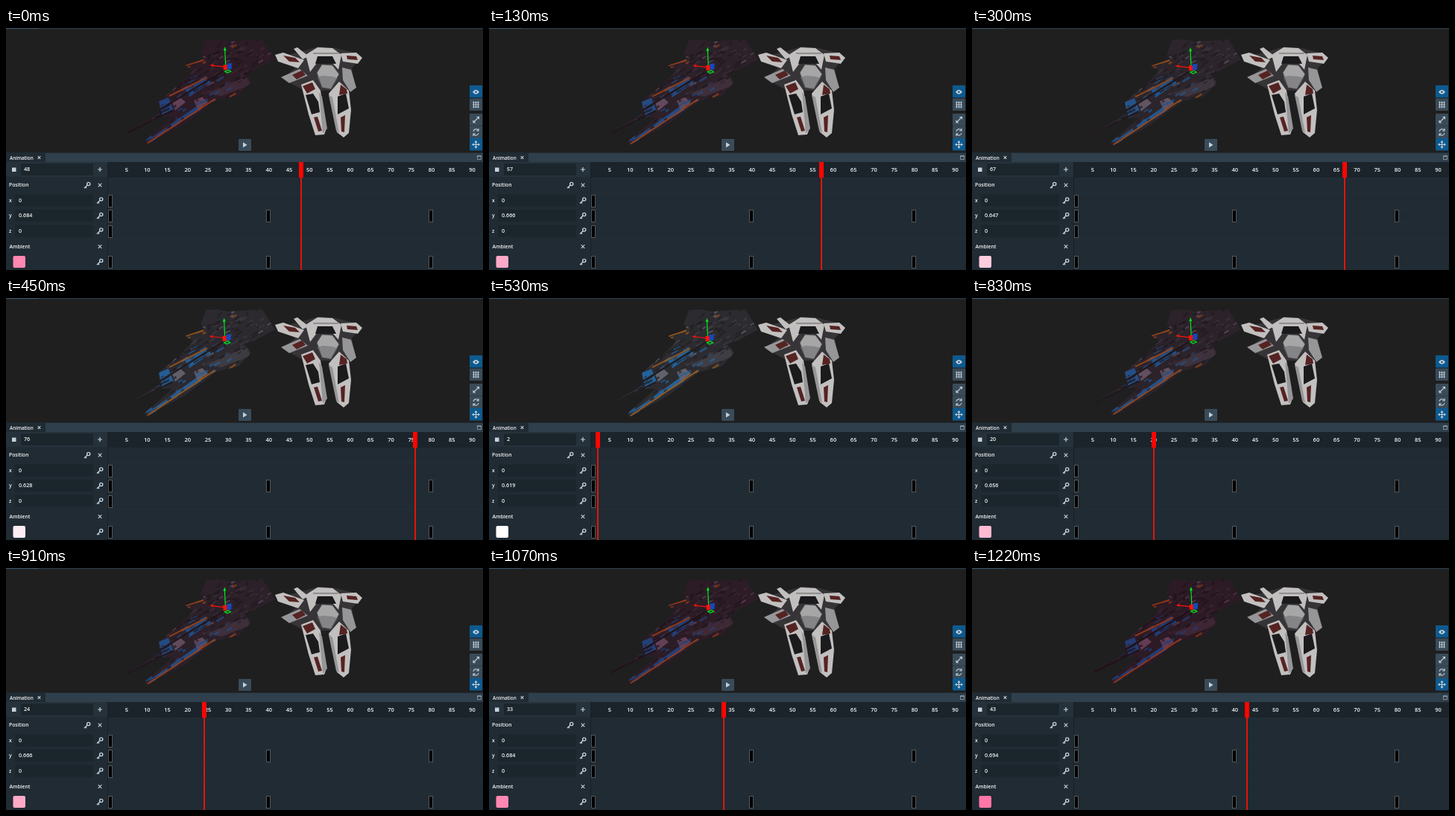
An HTML page with a canvas for the animation above (1300 ms loop, 640x325 px).

```html
<!DOCTYPE html>
<html lang="en">
<head>
<meta charset="utf-8">
<title>Animation timeline</title>
<style>
html, body { margin: 0; width: 100%; height: 100%; overflow: hidden; background: #202b33; }
canvas { display: block; }
</style>
</head>
<body>
<canvas id="stage" width="640" height="325"></canvas>
<script>
const g = document.getElementById('stage').getContext('2d');
const LOOP = 1300, STEPS = 17, RESTART = 7;
const ICON = '#c6d0d8';
const frameX = n => 134.7 + 5.453 * n;
const rowY = r => 211 + 20.5 * r;

function box(x, y, w, h, color, r = 0) {
  g.fillStyle = color;
  g.beginPath();
  g.roundRect(x, y, w, h, r);
  g.fill();
}
function shape(color, d) {
  g.fillStyle = color;
  g.fill(new Path2D(d));
}
function stroke(color, d, width = 1) {
  g.strokeStyle = color;
  g.lineWidth = width;
  g.stroke(new Path2D(d));
}
function text(s, x, y, size = 6.8, align = 'left') {
  g.font = `600 ${size}px "Open Sans", "Noto Sans", sans-serif`;
  g.textAlign = align;
  g.fillStyle = '#f4f7f9';
  g.fillText(s, x, y);
}
function random(seed) {
  return () => (seed = (seed * 16807) % 2147483647) / 2147483647;
}

// Blue ship: a hull outline filled with seeded plating along its long axis
const hull = new Path2D('M162 139L206 114 205 98 236 72 251 57 240 50 266 41 261 35 268 16 282 15 300 18 344 15 361 42 322 62 329 72 312 90 282 97 240 128 188 156 186 151 223 119 207 119 165 141Z');
const DARK = [31, 30, 34], GREY = [62, 62, 68], STEEL = [98, 98, 108], BLUE = [36, 98, 152], ORANGE = [150, 88, 28];

// u runs from nose to tail, v across the hull
function plateColor(u, v, pick) {
  if (pick < .4) return DARK;
  if (pick < .62) return GREY;
  if (pick < .7) return STEEL;
  if (Math.abs(v) > .28) return pick < .88 ? ORANGE : DARK;
  return u < .65 ? BLUE : GREY;
}
function blueShip(t) {
  const tint = ([r, gr, b]) => `rgb(${r},${gr * (1 - .42 * t)},${b * (1 - .25 * t)})`;
  const rnd = random(4711);
  g.save();
  g.translate(0, 15);
  g.scale(1, 1.03 - .03 * t);
  g.translate(0, -15);
  g.clip(hull);
  g.fillStyle = tint([44, 43, 48]);
  g.fill(hull);
  shape(tint(BLUE), 'M205 98L218 93 225 110 210 119Z M192 149L258 103 262 109 206 143Z M240 82L268 68 276 72 246 92Z');
  shape(tint(STEEL), 'M222 97L233 92 241 99 227 110Z M252 97L263 92 271 99 258 110Z');
  shape(tint(GREY), 'M270 87L322 65 328 76 289 91Z');
  g.globalAlpha = .7;
  for (let i = 0; i < 330; i++) {
    const u = rnd(), v = rnd() - .5, len = 2 + 8 * rnd(), wide = 1 + 2 * rnd();
    g.fillStyle = tint(plateColor(u, v, rnd()));
    g.beginPath();
    g.moveTo(172 + 180 * u + 45 * v, 140 - 112 * u + 72 * v);
    const x = 172 + 180 * u + 45 * v, y = 140 - 112 * u + 72 * v;
    g.lineTo(x + len, y - len * .58);
    g.lineTo(x + len + wide / 2, y - len * .58 + wide);
    g.lineTo(x + wide / 2, y + wide);
    g.fill();
  }
  g.globalAlpha = 1;
  stroke(tint(DARK), 'M163 140L224 110 M205 110L291 58', 2.5);
  stroke(tint(ORANGE), 'M190 154L280 95 M219 91L270 66 M241 50L265 43', 1.8);
  g.restore();
}

function whiteShip() {
  const pale = '#c2c0bf', mid = '#969597', red = '#552322', black = '#1b1a1d';
  shape('#363437', 'M364 40L402 30 420 25 442 27 466 33 477 40 464 54 469 80 440 84 400 84 371 68 388 54Z');
  shape(pale, 'M361 36L372 33 400 43 392 54 365 45Z M386 28L391 26 406 38 398 42Z M449 34L470 33 478 40 472 48 452 45Z');
  shape(mid, 'M369 66L394 55 405 64 380 74Z M451 53L463 56 470 80 462 86 452 70Z');
  shape(pale, 'M402 36L418 26 438 27 450 36 446 56 438 47 417 47 408 59Z');
  shape(pale, 'M396 76L412 70 422 84 430 135 427 143 415 144 406 116Z M433 88L447 72 460 84 463 110 460 141 453 147 444 140Z');
  shape(mid, 'M420 86L424 92 431 135 425 142Z M433 90L438 93 447 141 443 138Z');
  shape(black, 'M402 90L412 88 419 99 421 113 410 116Z M445 92L456 88 460 108 445 116Z M418 38L438 38 443 48 415 48Z');
  shape(red, 'M372 37L388 40 394 46 380 45Z M384 63L397 57 402 63 390 69Z M457 37L470 38 472 43 458 42Z M398 78L411 73 415 82 404 88Z M449 76L457 82 458 88 447 90Z M413 120L418 119 424 138 419 139Z M449 120L455 117 454 140 450 139Z');
  shape('#a6a6a7', 'M417 60L424 49 438 50 447 62 436 82 424 80Z');
  shape('#858588', 'M418 66L425 64 437 65 445 67 436 82 424 80Z');
  stroke('#444346', 'M417 60L424 49 438 50 447 62 436 82 424 80Z M412 34L446 34', .8);
}

function gizmo(t) {
  const green = '#00e71e', red = '#f7140b';
  g.save();
  g.translate(1.5 * t - 1.5, 2 - 2 * t);
  stroke(green, 'M295 52L294 29', 1.2);
  shape(green, 'M294 25L296 30 292 30Z');
  stroke(red, 'M295 52L277 50', 1.2);
  shape(red, 'M274 49.5L279 48 278 52Z');
  box(297, 47, 6, 8, '#1548bd');
  box(292, 49, 5, 7, red);
  stroke(green, 'M294 58L299 56 302 58 297 60Z', 1.2);
  g.restore();
}

function toolButtons() {
  const slate = '#394b59', blue = '#0e5a8f', tops = [77, 94.5, 115, 131.5, 148];
  tops.forEach((y, i) => box(622, y, 17, 16.5, i % 4 ? slate : blue, 1));
  shape(ICON, 'M626 86Q630.5 80 635 86 630.5 92 626 86Z');
  box(629.2, 84.7, 2.6, 2.6, blue, 1.3);
  for (let d = -3; d <= 3; d += 3) stroke(ICON, `M${630.5 + d} 98.5v9M626 ${103 + d}h9`, .9);
  stroke(ICON, 'M631.5 119.5h3v3M634 120l-6.5 6.5M627 124v3h3', 1.1);
  stroke(ICON, 'M627 139A3.7 3.7 0 0 1 633.8 137.5M634 135v3h-3M634 141A3.7 3.7 0 0 1 627.2 142.5M627 145v-3h3', 1.1);
  for (let q = 0; q < 4; q++) {
    g.save();
    g.translate(630.5, 156.5);
    g.rotate(q * Math.PI / 2);
    shape(ICON, 'M0 -5.5L2.1 -2.8H.6V0H-.6V-2.8H-2.1Z');
    g.restore();
  }
  box(312, 149, 17, 16, slate, 1);
  shape(ICON, 'M318 153.5L323.5 157 318 160.5Z');
}

function cross(x, y, r = 2.3) {
  stroke(ICON, `M${x - r} ${y - r}l${2 * r} ${2 * r}m0 ${-2 * r}l${-2 * r} ${2 * r}`, 1.1);
}
function key(x, y) {
  g.strokeStyle = ICON;
  g.lineWidth = 1.4;
  g.beginPath();
  g.arc(x + 1.7, y - 1.5, 2.1, 0, 7);
  g.stroke();
  stroke(ICON, `M${x + .2} ${y}l-4.2 4M${x - 2.5} ${y + 2.4}l1.5 1.5`, 1.4);
}
function field(label, value, r) {
  const y = rowY(r);
  text(label, 4, y + 2.2);
  box(12, y - 8, 105, 16, '#1b252c', 1);
  text(value, 17, y + 2.4, 7.2);
  key(126, y);
}
function keyframe(n, r) {
  const x = n ? Math.floor(frameX(n) - 3.2) : 137, y = Math.round(rowY(r));
  box(x, y - 8, 6, 17, '#55585b');
  box(x + 1, y - 7, 4, 15, '#000');
}

function panel(head, height, t) {
  box(0, 167, 640, 158, '#202b33');
  box(0, 168, 640, 12, '#2f3f4c');
  box(0, 168, 53, 12, '#202b33');
  text('Animation', 5, 176.5, 6.3);
  cross(44.5, 174, 1.8);
  stroke('#93a1ad', 'M632.5 171.5h5v5h-5ZM632 172.5h6', .8);

  box(0, 180, 136, 20, '#26323b');
  box(20, 182, 97, 16, '#1b252c', 1);
  box(8, 187.5, 5.5, 5.5, ICON);
  text(head, 24, 192.4, 7.2);
  stroke(ICON, 'M123 190h6m-3 -3v6', 1.2);
  text('Position', 4, 213.3);
  key(109, 211);
  cross(126, 211);
  field('x', '0', 1);
  field('y', '0.' + height, 2);
  field('z', '0', 3);
  text('Ambient', 4.5, 295.8);
  cross(126, 293.5);
  box(9.5, 306, 16.5, 16, `rgb(255,${255 - 147 * t},${255 - 94 * t})`, 2);
  key(126, 314);

  box(137, 180, 503, 21, '#1b242b');
  box(136, 180, 1, 145, '#172027');
  for (let r = 0; r < 6; r++) box(137, rowY(r) - 10, 503, .6, '#26323b');
  for (let n = 5; n <= 90; n += 5) text(n, frameX(n), 193.4, 7.5, 'center');
  for (let r = 1; r < 6; r++) {
    if (r === 4) continue;
    keyframe(0, r);
    if (r % 3 === 2) [40, 80].forEach(n => keyframe(n, r));
  }

  const x = Math.round(frameX(head));
  box(x - 1, 200, 2, 125, '#e2140a');
  box(x - 3, 180, 6, 21, '#ff0500');
}

function draw(now) {
  // the picture advances in even steps, slightly ahead of the clock
  const step = Math.min(STEPS - 1, Math.floor((now % LOOP + 23) / LOOP * STEPS));
  const head = Math.floor(step < RESTART ? 48 + 4.75 * step : 2 + 4.565 * (step - RESTART));
  const away = Math.abs(step - RESTART);
  const rise = 9.33 * Math.min(away, STEPS - away);
  const t = rise / 80;
  box(0, 0, 640, 168, '#1f1f1f');
  box(0, 0, 640, 1.5, '#293742');
  box(0, 0, 44, 1, '#3b5263');
  blueShip(t);
  whiteShip();
  gizmo(t);
  toolButtons();
  panel(head, Math.round(619.1 + rise), t);
}

let origin;
function tick(now) {
  origin ??= now;
  draw(now - origin);
  requestAnimationFrame(tick);
}
draw(0);
requestAnimationFrame(tick);
</script>
</body>
</html>
```
